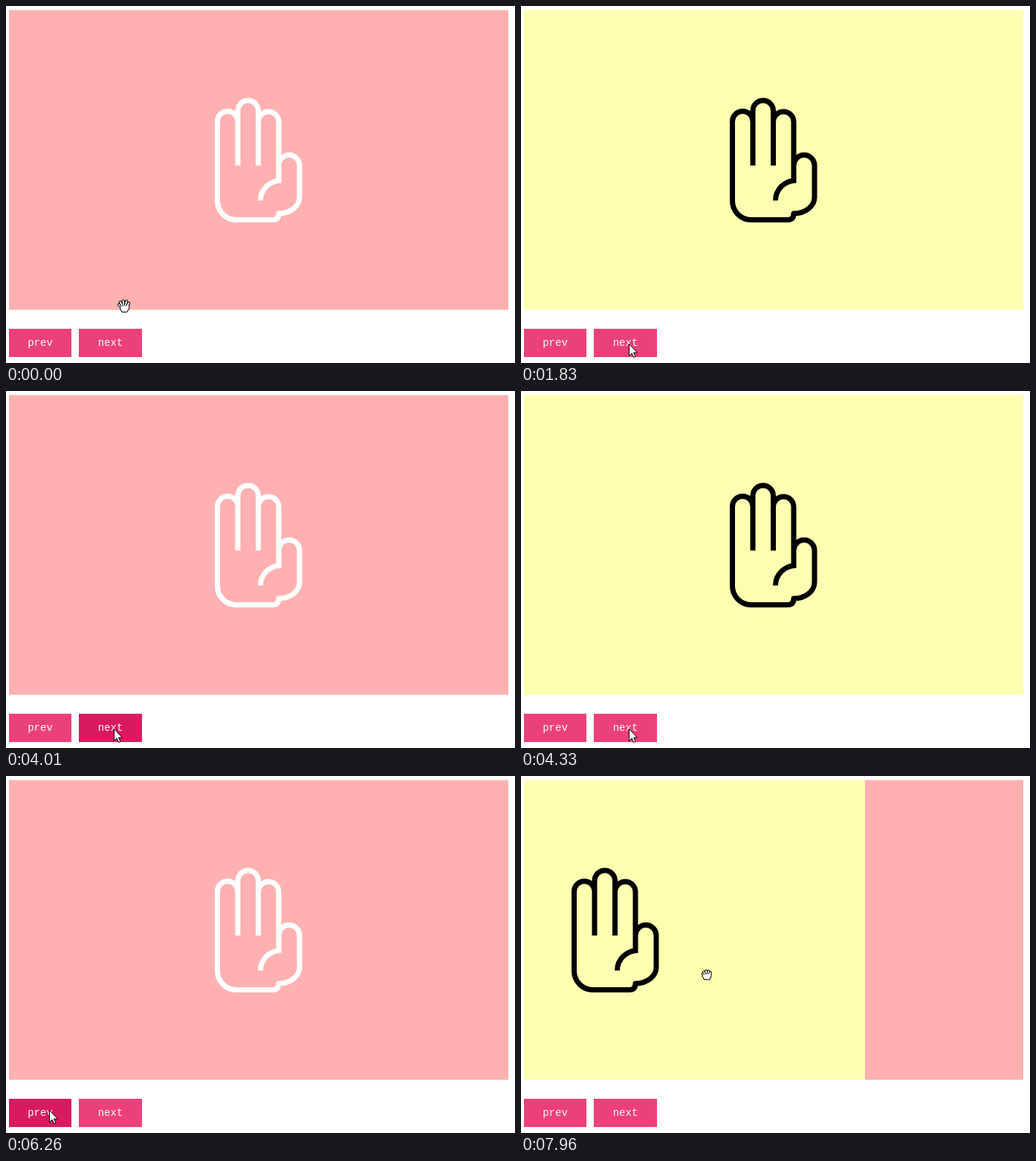
Animation, 685 px wide and 480 px high, one loop 8 s. Source, as an HTML page with a canvas:

```html
<!DOCTYPE html>
<html lang="en">
<head>
<meta charset="utf-8">
<title>Carousel</title>
<style>
  html, body { margin: 0; width: 100%; height: 100%; overflow: hidden; background: #fff; }
  canvas { position: absolute; left: 0; top: 0; }
  .btn {
    position: absolute; top: 434px; height: 38px;
    background: #ec407a; color: #fff; text-align: center;
    font: 14px/39px "Liberation Mono", "Noto Sans Mono", monospace;
  }
  .btn.down { background: #d81b60; }
  #prev { left: 4px; width: 84px; }
  #next { left: 98px; width: 85px; }
</style>
</head>
<body>
<div class="btn" id="prev">prev</div>
<div class="btn" id="next">next</div>
<canvas id="stage" width="685" height="480"></canvas>
<script>
const LOOP = 8000;
const TICK = 77.53, PHASE = 44.4;     // the screen refreshes at a steady, low rate
const SLIDE_MS = 200, PRESS_MS = 155;
const VIEW = { x: 4, y: 5.4, w: 672, h: 403.2 };
const THEMES = [
  { back: '#ffb1b1', ink: '#fff' },
  { back: '#ffffb1', ink: '#000' }
];

const SLIDES = [
  { start: 1578.3, dir: 1 },
  { start: 2890.5, dir: 1 },
  { start: 4086.5, dir: 1 },
  { start: 5166.4, dir: 1 },
  { start: 6400, dir: -1 }
];

// Pointer: rest place, then moves to the buttons and back to the slides
const REST = { x: 159, y: 403 };
const GRAB = { t: 7600, x: 463, y: 267 };
const MOVES = [
  { from: 300, to: 1050, x: 145, y: 454, sway: 0 },
  { from: 5640, to: 6100, x: 58, y: 449, sway: 3 },
  { from: 6775, to: 7565, x: GRAB.x, y: GRAB.y, sway: 30 },
  { from: GRAB.t, to: 7950, x: 250, y: GRAB.y, sway: 0 }
];

const ctx = document.getElementById('stage').getContext('2d');
const prev = document.getElementById('prev');
const next = document.getElementById('next');

const hand = new Path2D(
  'M312 214.5V140.75A13.75 13.75 0 0 1 339.5 140.75V214.5' +
  'M312 155.25A13.75 13.75 0 0 0 284.5 155.25V262A25 25.5 0 0 0 309.5 287.5' +
  'H359Q367 287.5 367 279C383 279 395 269 395 257V214.3A14 14 0 0 0 367 214.3' +
  'M339.5 155.75A13.75 13.75 0 0 1 367 155.75V237.5' +
  'M370.5 234.4A28 27.1 0 0 0 342.5 261.5'
);
const arrow = new Path2D('M.5 .5V16.5L4.2 13L6.6 18.5L9 17.5L6.6 12H11.5Z');

const clamp = p => Math.min(1, Math.max(0, p));
const smooth = p => p * p * p * (10 - 15 * p + 6 * p * p);

// cubic-bezier(0, 0, .58, 1)
function easeOut(p) {
  let lo = 0, hi = 1;
  for (let i = 0; i < 24; i++) {
    const s = (lo + hi) / 2;
    if (1.74 * (1 - s) * s * s + s * s * s < p) lo = s; else hi = s;
  }
  return lo * lo * (3 - 2 * lo);
}

function pointerAt(t) {
  let { x, y } = REST;
  for (const m of MOVES) {
    const e = smooth(clamp((t - m.from) / (m.to - m.from)));
    x += (m.x - x) * e;
    y += (m.y - y) * e + m.sway * Math.sin(2 * Math.PI * e);
  }
  return { x: Math.round(x), y: Math.round(y) };
}

function drawSlides(pos) {
  ctx.save();
  ctx.beginPath();
  ctx.rect(VIEW.x, VIEW.y, VIEW.w, VIEW.h);
  ctx.clip();
  ctx.lineWidth = 7;
  ctx.lineJoin = 'round';
  const first = Math.floor(pos + 1e-6);
  for (let n = first; n <= first + 1; n++) {
    const theme = THEMES[n % 2];
    ctx.save();
    ctx.translate((n - pos) * VIEW.w, 0);
    ctx.fillStyle = theme.back;
    ctx.fillRect(VIEW.x, 0, VIEW.w, 480);
    ctx.strokeStyle = theme.ink;
    ctx.stroke(hand);
    ctx.restore();
  }
  ctx.restore();
}

function line(x1, y1, x2, y2, width, color) {
  ctx.beginPath();
  ctx.moveTo(x1, y1);
  ctx.lineTo(x2, y2);
  ctx.lineWidth = width;
  ctx.strokeStyle = color;
  ctx.stroke();
}

// Thumb and four fingers fan out over a palm; a closed hand has short ones
function drawPalm(closed) {
  const size = closed ? 0.75 : 1;
  const palm = new Path2D(closed
    ? 'M-4.5 0L-5.5 2L-3 6.3H3.5L5.5 2V-1Z'
    : 'M-4 1L-5 4L-2.5 8H3.5L6 4L6.5 0Z');
  ctx.lineCap = ctx.lineJoin = 'round';
  ctx.strokeStyle = '#000';
  ctx.lineWidth = 2;
  ctx.stroke(palm);
  for (let i = 0; i < 5; i++) {
    const a = (-85 + 37 * i) * Math.PI / 180;
    const tip = [7 * size * Math.sin(a), size * (1 - 7.5 * Math.cos(a * 0.85))];
    const root = [(i - 2) * 2 * size, 1];
    line(...root, ...tip, 4, '#000');
    line(...root, ...tip, 2, '#fff');
  }
  ctx.fillStyle = '#fff';
  ctx.fill(palm);
}

function drawArrow() {
  ctx.fillStyle = '#fff';
  ctx.strokeStyle = '#000';
  ctx.lineWidth = 1;
  ctx.fill(arrow);
  ctx.stroke(arrow);
}

function draw(now) {
  const t = PHASE + TICK * Math.floor((now % LOOP - PHASE) / TICK);
  const { x, y } = pointerAt(t);
  const grabbed = t >= GRAB.t;
  let pos = grabbed ? (GRAB.x - x) / VIEW.w : 0;
  let down = 0;
  for (const { start, dir } of SLIDES) {
    pos += dir * easeOut(clamp((t - start) / SLIDE_MS));
    if (t > start - PRESS_MS && t < start) down = dir;
  }
  prev.classList.toggle('down', down < 0);
  next.classList.toggle('down', down > 0);

  ctx.clearRect(0, 0, 685, 480);
  drawSlides(pos);
  ctx.save();
  ctx.translate(x, y);
  if (y < VIEW.y + VIEW.h) drawPalm(grabbed); else drawArrow();
  ctx.restore();
}

const begin = performance.now();
function tick() {
  draw(performance.now() - begin);
  requestAnimationFrame(tick);
}
tick();
</script>
</body>
</html>
```
